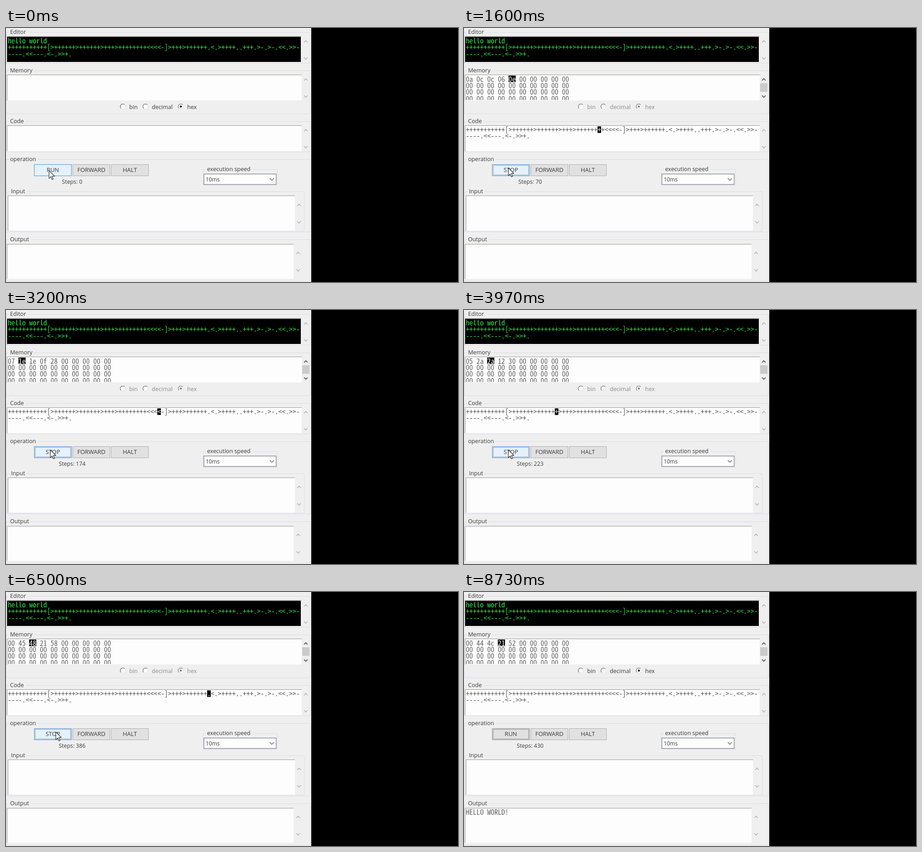
An HTML page for the animation above (8790 ms loop, 998 by 561 pixels).

```html
<!DOCTYPE html>
<html lang="en">
<head>
<meta charset="utf-8">
<title>Interpreter</title>
<style>
html, body { margin: 0; width: 100%; height: 100%; overflow: hidden; background: #000; }
svg { display: block; width: 100%; height: 100%; }
text { font: 12.6px "Open Sans", "Noto Sans", sans-serif; fill: #3a3a3a; }
.mono { font: 15.7px "Noto Sans Mono CJK JP", "Noto Sans CJK JP", "Noto Sans Mono", monospace; fill: #5e5e5e; text-anchor: middle; }
.code { fill: #505050; }
.green { fill: #30f048; }
.hot { fill: #fff; }
.mid { text-anchor: middle; }
</style>
</head>
<body>
<svg id="stage" viewBox="0 0 998 561" preserveAspectRatio="none"></svg>
<script>
const LOOP = 8790, START = 430, CELL = 7.86, LEFT = 4;
const SOURCE = "+++++++++++[>++++++>++++++>+++>++++++++<<<<-]>+++>++++++.<.>++++..+++.>-.>-.<<.>>-----.<<---.<-.>>+.";
const WRAP = 82;
const stage = document.getElementById("stage");

function add(tag, attrs, text, parent = stage) {
  const el = document.createElementNS("http://www.w3.org/2000/svg", tag);
  set(el, attrs);
  if (text !== undefined) el.textContent = text;
  parent.appendChild(el);
  return el;
}
function set(el, attrs) {
  for (const k in attrs) el.setAttribute(k, attrs[k]);
}
function show(el, on) {
  el.setAttribute("visibility", on ? "visible" : "hidden");
}
const rect = (x, y, width, height, fill, more) => add("rect", { x, y, width, height, fill, ...more });
const path = (d, stroke, more) => add("path", { d, stroke, fill: "none", ...more });
const label = (x, y, text, more) => add("text", { x, y, ...more }, text);

// Monospaced line, one character per grid cell
function cells(col, n) {
  return Array.from({ length: n }, (_, i) => (LEFT + (col + i + 0.5) * CELL).toFixed(2)).join(" ");
}
function mono(y, text, kind = "") {
  return add("text", { x: cells(0, Math.max(1, text.length)), y, class: "mono " + kind }, text);
}
function write(el, text, col = 0) {
  if (el.textContent === text && el.col === col) return;
  el.col = col;
  el.setAttribute("x", cells(col, Math.max(1, text.length)));
  el.textContent = text;
}

function group(x, y, right, bottom, name, lx, gapEnd) {
  path(`M${lx - 3} ${y}H${x}V${bottom}H${right}V${y}H${gapEnd}`, "#dcdde6");
  label(lx, y + 3.8, name);
}
function box(x, y, right, bottom, fill = "#fdfdfd") {
  rect(x, y, right - x, bottom - y, fill);
  path(`M${x + 0.5} ${bottom}V${y + 0.5}H${right}`, "#96968f");
}
function arrows(x, up, down, color = "#b4b4b4") {
  return path(`M${x - 4} ${up + 2}l4 -4l4 4M${x - 4} ${down - 2}l4 4l4 -4`, color, { "stroke-width": 1.7 });
}
function button(x, name) {
  const face = rect(x + 0.5, 301.5, 82, 25, "#e1e1e1", { stroke: "#adadad" });
  return { face, text: label(x + 41.5, 318.4, name, { class: "mid", style: "font-size:13px" }) };
}

// Run the program once, keeping every state
function trace(code) {
  const mem = Array(10).fill(0), states = [];
  let pc = 0, ptr = 0, out = "", top = 0;
  const save = () => states.push({ pc, ptr, out, mem: mem.slice() });
  save();
  while (pc < code.length) {
    const op = code[pc];
    if (op === "+") mem[ptr]++;
    else if (op === "-") mem[ptr]--;
    else if (op === ">") ptr++;
    else if (op === "<") ptr--;
    else if (op === ".") out += String.fromCharCode(mem[ptr]);
    else if (op === "[") top = pc;
    else if (op === "]" && mem[ptr]) pc = top;
    pc++;
    save();
  }
  return states;
}
const states = trace(SOURCE), LAST = states.length - 1;
const hex = n => n.toString(16).padStart(2, "0");
const lines = [SOURCE.slice(0, WRAP), SOURCE.slice(WRAP)];

// Panel
rect(0, 0, 998, 561, "#000");
rect(0, 0, 674, 561, "#efefef");
group(0.5, 9.5, 672.5, 77.5, "Editor", 9, 49);
group(0.5, 94.5, 672.5, 189.5, "Memory", 9, 62);
group(0.5, 206.5, 672.5, 273.5, "Code", 9, 44);
group(0.5, 290.5, 672.5, 450.5, "operation", 9, 70);
group(435.5, 312.5, 599.5, 347.5, "execution speed", 444, 545);
group(2.5, 361.5, 658.5, 448.5, "Input", 11, 47);
group(0.5, 467.5, 672.5, 559.5, "Output", 9, 56);

// Editor
box(2, 18, 652, 76);
rect(2.5, 19.5, 648.5, 55.5, "#000");
mono(33.8, "hello world", "green");
lines.forEach((s, i) => mono(48 + i * 14.5, s, "green"));
arrows(662, 30, 67);

// Memory
box(2, 103, 653, 160);
add("rect", { x: 2, y: 104, width: 650, height: 55 }, undefined,
  add("clipPath", { id: "view" }));
const memView = add("g", { "clip-path": "url(#view)" });
const memRows = [0, 1, 2, 3].map(i =>
  add("text", { x: cells(0, 29), y: 118.5 + i * 14.4, class: "mono" }, Array(10).fill("00").join(" "), memView));
const memMark = rect(0, 105, 2 * CELL, 14.5, "#000");
const memHot = mono(118.5, "", "hot");
const memArrows = arrows(662, 114, 151);
const thumb = rect(654, 122, 16, 19, "#cbcbcb");

// Radio buttons
const radioText = [[258, "bin"], [308, "decimal"], [386, "hex"]].map(([x, name]) => {
  add("circle", { cx: x, cy: 173.5, r: 5.5, fill: "#fdfdfd", stroke: "#dedede" });
  path(`M${x - 4} 177.5A5.6 5.6 0 0 1 ${x + 4} 169.5`, "#777", { "stroke-width": 1.3 });
  return label(x + 14, 179, name);
});
const radioDot = add("circle", { cx: 386, cy: 173.5, r: 2.2 });

// Code
box(2, 215, 653, 272);
const codeY = row => 229.8 + row * 14.5;
const codeRows = lines.map((s, i) => mono(codeY(i), s, "code"));
const codeMark = rect(0, 0, CELL, 14.5, "#000");
const codeHot = mono(0, "", "hot");
arrows(662, 226, 263);

// Operation
const run = button(62, "RUN");
const focus = rect(64.5, 303.5, 78, 21, "none", { stroke: "#444", "stroke-dasharray": "1 1" });
button(147, "FORWARD");
button(232, "HALT");
const steps = label(146, 344.3, "", { class: "mid", style: "font-size:12.3px" });
rect(437, 322.5, 159.5, 23, "#fdfdfd", { stroke: "#7c8088", "stroke-width": 1.3 });
label(441, 339, "10ms", { style: "font-size:12px" });
path("M582.5 332l4.5 4.5l4.5 -4.5", "#555", { "stroke-width": 1.2 });

// Input and output
box(4, 370, 638, 448);
arrows(647, 391, 429);
box(2, 477, 635, 554);
arrows(645, 497, 535);
const output = mono(491.5, "");

const pointer = add("path", {
  d: "M0 0V17.2L4 13.4L6.7 19.8L9.3 18.7L6.6 12.4H12.2Z",
  fill: "#fff", stroke: "#222", "stroke-width": 1.1, "stroke-linejoin": "round"
});

// Rows of [time, value, ...], interpolated between neighbours
function along(keys, t, ease = k => k) {
  let i = 0;
  while (i < keys.length - 2 && t >= keys[i + 1][0]) i++;
  const [a, b] = [keys[i], keys[i + 1]];
  const k = ease(Math.min(1, Math.max(0, (t - a[0]) / (b[0] - a[0]))));
  return a.slice(1).map((v, j) => v + (b[j + 1] - v) * k);
}
const smooth = k => k * k * (3 - 2 * k);
const pace = [[START, 0], [600, 5.57], [3970, 223.95], [7170, 430.03]];
const moves = [[70, 95, 315], [270, 98, 309], [4950, 98, 309], [5150, 110, 309], [7300, 110, 309], [8400, 150, 572]];

function draw(time) {
  // The picture advances thirty times a second
  const t = Math.round(Math.floor((time + 3.4) * 0.03) * 10 / 3) * 10;
  const on = t >= START;
  const [u] = along(pace, t);
  const n = Math.min(LAST, Math.floor(u));
  const now = states[n], mem = states[Math.min(LAST, Math.floor(u + 0.1))];
  const running = on && n < LAST;

  memRows.forEach(r => show(r, on));
  [memMark, memHot, thumb].forEach(e => show(e, on));
  memRows[0].textContent = mem.mem.map(hex).join(" ");
  write(memHot, hex(mem.mem[mem.ptr]), mem.ptr * 3);
  set(memMark, { x: LEFT + mem.ptr * 3 * CELL });
  set(memArrows, { stroke: on ? "#4a4a4a" : "#b4b4b4" });

  radioText.forEach(e => { e.style.fill = running ? "#8c8c8c" : "#3a3a3a"; });
  set(radioDot, { fill: running ? "#777" : "#000" });

  codeRows.forEach(r => show(r, on));
  show(codeMark, running);
  show(codeHot, running);
  if (running) {
    const row = now.pc < WRAP ? 0 : 1, col = now.pc - row * WRAP;
    set(codeMark, { x: LEFT + col * CELL, y: codeY(row) - 12.5 });
    set(codeHot, { y: codeY(row) });
    write(codeHot, SOURCE[now.pc], col);
  }

  const [x, y] = along(moves, t, smooth);
  const hover = x > 62 && x < 145 && y > 301 && y < 327;
  run.text.textContent = running ? "STOP" : "RUN";
  set(run.face, { fill: hover ? "#e5f1fb" : "#e1e1e1", stroke: hover ? "#4a90d6" : "#8f8f8f" });
  show(focus, on);
  steps.textContent = "Steps: " + (on ? n : 0);
  write(output, on ? now.out : "");
  set(pointer, { transform: `translate(${x.toFixed(1)} ${y.toFixed(1)})` });
}

const begin = performance.now();
function tick() {
  draw((performance.now() - begin) % LOOP);
  requestAnimationFrame(tick);
}
tick();
</script>
</body>
</html>
```
